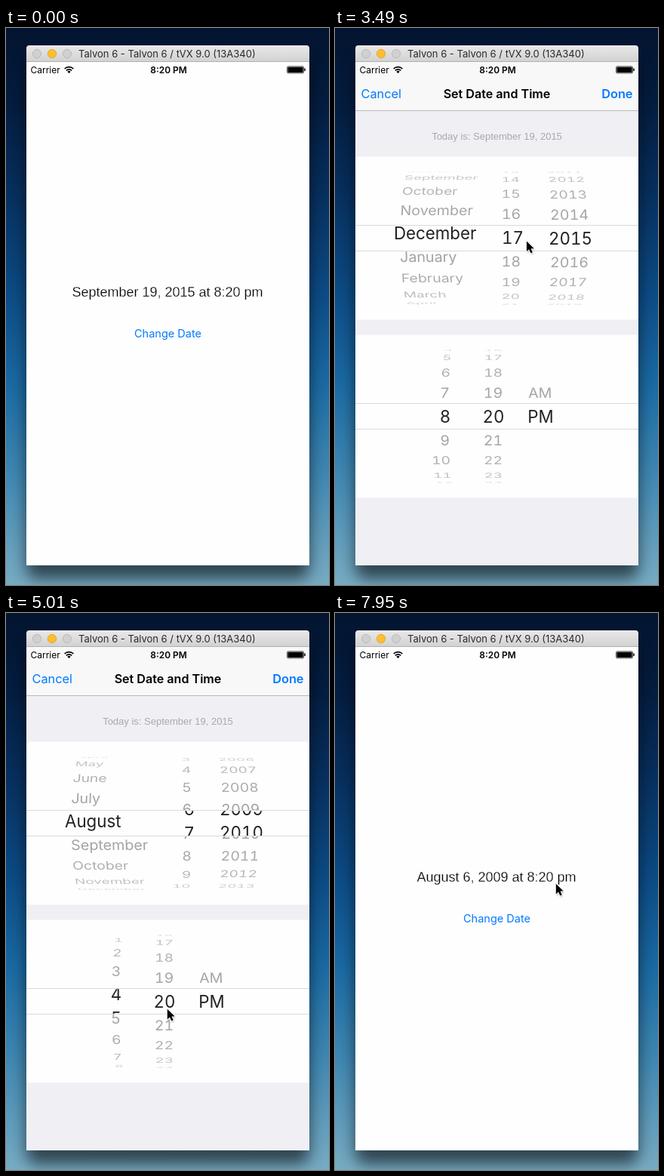
Write an HTML page that moves like this. It is 428 by 738 pixels and loops after 8000 ms.

```html
<!DOCTYPE html>
<html lang="en">
<head>
<meta charset="utf-8">
<title>Date picker</title>
<style>
  html, body { margin: 0; width: 100%; height: 100%; overflow: hidden; background: #03142f; }
  svg { display: block; width: 428px; height: 738px; font-family: Inter, Roboto, sans-serif; }
  .helv { font-family: "Liberation Sans", Arial, sans-serif; }
  .blue { fill: #007aff; }
  .outer, .inner { font-variant-numeric: tabular-nums; }
  .outer { font-size: 19.8px; fill: #a0a0a0; }
  .inner { font-size: 22.3px; fill: #222; }
</style>
</head>
<body>
<svg viewBox="0 0 428 738">
  <defs>
    <linearGradient id="sky" x1="0" y1="0" x2="0" y2="1">
      <stop offset="0" stop-color="#03142f"/>
      <stop offset=".14" stop-color="#041d40"/>
      <stop offset=".3" stop-color="#07305f"/>
      <stop offset=".48" stop-color="#0c4c86"/>
      <stop offset=".64" stop-color="#1b6aa3"/>
      <stop offset=".8" stop-color="#3f87b2"/>
      <stop offset="1" stop-color="#78abc2"/>
    </linearGradient>
    <linearGradient id="bar" x1="0" y1="0" x2="0" y2="1">
      <stop offset="0" stop-color="#e9e9e9"/>
      <stop offset="1" stop-color="#d1d1d1"/>
    </linearGradient>
    <filter id="blur" x="-20%" y="-20%" width="140%" height="140%"><feGaussianBlur stdDeviation="10"/></filter>
    <filter id="soft" x="-50%" y="-50%" width="200%" height="200%"><feGaussianBlur stdDeviation="1"/></filter>
    <clipPath id="screen"><rect x="27" y="45" width="375" height="667"/></clipPath>
    <clipPath id="band"><rect x="27" y="-16.5" width="375" height="33"/></clipPath>
    <path id="arrow" d="M0 0V13.6L3.2 10.7L5.5 15.8L7.9 14.7L5.7 9.8H9.9Z"/>
  </defs>

  <rect width="428" height="738" fill="url(#sky)"/>
  <rect x="27" y="40" width="375" height="690" rx="14" opacity=".58" filter="url(#blur)"/>
  <path d="M27 45V27a4 4 0 0 1 4-4H398a4 4 0 0 1 4 4V45Z" fill="url(#bar)"/>
  <path d="M27 44.5H402" stroke="#b1b1b1"/>
  <g fill="#d0d0d0" stroke="#b4b4b4" stroke-width=".8">
    <circle cx="41" cy="34" r="5.7"/>
    <circle cx="61" cy="34" r="5.7" fill="#ffbe2f" stroke="#dfa023"/>
    <circle cx="81" cy="34" r="5.7"/>
  </g>
  <text x="96" y="38.7" font-size="13" fill="#2a2a2a">Talvon 6 - Talvon 6 / tVX 9.0 (13A340)</text>

  <g clip-path="url(#screen)">
    <rect x="27" y="45" width="375" height="667" fill="#fefefe"/>
    <text id="label" class="helv" x="214" y="355.6" font-size="18" text-anchor="middle" stroke="#fefefe" stroke-width=".3"></text>
    <text id="change" class="blue" x="214.5" y="410" font-size="14.5" text-anchor="middle">Change Date</text>
    <g id="modal">
      <rect x="27" y="45" width="375" height="667" fill="#efeff4"/>
      <rect x="27" y="45" width="375" height="64" fill="#f8f8f9"/>
      <path d="M27 109.5H402" stroke="#b9b9bb"/>
      <g font-size="16.3">
        <text class="blue" x="34.5" y="93">Cancel</text>
        <text x="214.5" y="93" font-size="16.1" font-weight="600" text-anchor="middle">Set Date and Time</text>
        <text id="done" class="blue" x="394.5" y="93" font-weight="600" text-anchor="end">Done</text>
      </g>
      <text class="helv" x="214.5" y="147.5" font-size="13" fill="#a9a9ad" text-anchor="middle">Today is: September 19, 2015</text>
      <g id="date" transform="translate(0 278.7)"></g>
      <g id="time" transform="translate(0 514.7)"></g>
    </g>
  </g>

  <g font-size="12">
    <text x="32.5" y="59.6">Carrier</text>
    <text x="215.5" y="59.6" font-size="11.9" font-weight="600" text-anchor="middle">8:20 PM</text>
  </g>
  <g fill="none" stroke="#000" stroke-width="1.7">
    <path d="M77.6 54a8.4 8.4 0 0 1 11.8 0M79.8 56.3a5.3 5.3 0 0 1 7.4 0"/>
    <path d="M83.5 60L81.3 57.8a3.1 3.1 0 0 1 4.4 0Z" fill="#000" stroke="none"/>
    <rect x="372.5" y="50.9" width="22" height="9" rx="1.5" stroke-width=".7"/>
    <rect x="373.4" y="51.8" width="20.2" height="7.2" rx=".8" fill="#000" stroke="none"/>
    <path d="M396 53.6V57" stroke-width="1.4"/>
  </g>

  <g id="cursor">
    <use href="#arrow" x=".8" y="1.8" opacity=".4" filter="url(#soft)"/>
    <use href="#arrow" stroke="#fff" stroke-width="1.8" stroke-linejoin="round"/>
    <use href="#arrow"/>
  </g>
</svg>

<script>
const LOOP = 8000, TILT = 20.7 * Math.PI / 180, RADIUS = 88, MID_X = 214.5, DEPTH = .09;
const OPEN = 2050, CLOSE = 6285;
const $ = id => document.getElementById(id);
const mod = (n, m) => ((n % m) + m) % m;
const clamp = v => Math.min(1, Math.max(0, v));

function add(parent, tag, attrs) {
  const el = document.createElementNS('http://www.w3.org/2000/svg', tag);
  for (const k in attrs) el.setAttribute(k, attrs[k]);
  return parent.appendChild(el);
}

// A flicked wheel coasts from one value to another
const flick = (from, to, start, tau, span) => t => {
  const end = Math.exp(-span / tau);
  const left = (Math.exp(-Math.max(0, t - start) / tau) - end) / (1 - end);
  return to + (from - to) * clamp(left);
};

const monthName = i => new Date(2015, mod(i - 1, 12), 1).toLocaleString('en-US', { month: 'long' });

// x: anchor of the selected row, side: anchor of the other rows, mid: column centre
const dateWheels = [
  { x: 78, side: 85.5, mid: 125, anchor: 'start', text: monthName, at: flick(9, -4, 2907, 530, 2350) },
  { x: 250, side: 246.3, mid: 235, anchor: 'end', text: i => mod(i - 1, 31) + 1, at: flick(19, 6, 3389, 650, 2100) },
  { x: 312, side: 311, mid: 311, anchor: 'middle', text: i => i, at: flick(2015, 2009, 3990, 500, 1700) }
];
const timeWheels = [
  { x: 153.3, side: 151.7, mid: 145, anchor: 'end', text: i => mod(i - 1, 12) + 1, at: flick(8, 1, 4635, 510, 2200) },
  { x: 210, side: 209.5, mid: 210, anchor: 'middle', text: i => String(mod(i, 60)).padStart(2, '0'), at: flick(20, 5, 5150, 495, 2400) },
  { x: 272.5, side: 272, mid: 272, anchor: 'middle', text: i => ['AM', 'PM'][i] || '', at: () => 1 }
];

function buildPicker(parent, wheels) {
  add(parent, 'rect', { x: 27, y: -108.2, width: 375, height: 216, fill: '#fefefe' });
  const outer = add(parent, 'g', { class: 'outer' });
  add(parent, 'rect', { x: 27, y: -17, width: 375, height: 34, fill: '#fefefe' });
  const inner = add(parent, 'g', { class: 'inner', 'clip-path': 'url(#band)' });
  add(parent, 'path', { d: 'M27 -17.2H402M27 16.8H402', stroke: '#dadada' });
  for (const w of wheels) {
    w.outer = Array.from({ length: 11 }, () => add(outer, 'text', { x: w.side, y: 7.2, 'text-anchor': w.anchor }));
    w.inner = Array.from({ length: 3 }, () => add(inner, 'text', { x: w.x, 'text-anchor': w.anchor }));
  }
}

// Rows lie on a cylinder; the selected band shows a flat, larger copy
function drawWheel(w, t) {
  const v = w.at(t), near = Math.round(v);
  w.outer.forEach((el, k) => {
    const i = near + k - 5, a = (i - v) * TILT;
    const shown = Math.abs(a) < 1.53;
    el.textContent = shown ? w.text(i) : '';
    if (!shown) return;
    const cos = Math.cos(a), sin = Math.sin(a), s = 1 / (1 + DEPTH * (1 - cos));
    const skew = (MID_X - w.mid) * DEPTH * sin * s * s / RADIUS;
    el.setAttribute('transform', `matrix(${s} 0 ${skew} ${cos} ${MID_X * (1 - s)} ${RADIUS * sin})`);
    el.setAttribute('opacity', .3 + .7 * cos);
  });
  w.inner.forEach((el, k) => {
    const i = near + k - 1;
    el.textContent = w.text(i);
    el.setAttribute('y', (i - v) * 31.5 + 8.1);
  });
}

// Pointer stops: time, x, y
const stops = [
  [510, 0, 535], [800, 243, 360], [930, 229, 398], [2300, 229, 398], [2730, 149, 305],
  [2880, 148, 287], [3120, 156, 345], [3390, 237, 280], [3810, 304, 287], [3980, 302, 312],
  [4500, 152, 556], [4900, 208, 505], [5280, 225, 570], [5460, 366, 88], [6610, 366, 88],
  [6880, 285, 318], [7350, 125, 345], [7860, 292, 358], [LOOP, 292, 358]
];

function pointer(t) {
  const n = stops.findIndex(s => s[0] > t);
  if (n < 1) return null;
  const [a, ax, ay] = stops[n - 1], [b, bx, by] = stops[n];
  const u = (t - a) / (b - a);
  return [ax + (bx - ax) * u, ay + (by - ay) * u];
}

// Remaining share of a critically damped spring
const spring = (ms, w) => (1 + w * ms / 1000) * Math.exp(-w * ms / 1000);

function hiddenShare(t) {
  if (t < OPEN) return 1;
  const share = t < CLOSE ? spring(t - OPEN, 14.8) : 1 - spring(t - CLOSE, 22.8);
  return share < .002 ? 0 : share > .98 ? 1 : share;
}

// A pressed button dims at once and then fades back
const pressed = (t, at, rest, fade) => t < at ? 1 : .25 + .75 * clamp((t - at - rest) / fade);

function render(t) {
  const hidden = hiddenShare(t), p = pointer(t);
  $('label').textContent = (t < CLOSE ? 'September 19, 2015' : 'August 6, 2009') + ' at 8:20 pm';
  $('change').setAttribute('opacity', pressed(t, 1260, 90, 420));
  $('done').setAttribute('opacity', pressed(t, 6190, 50, 300));
  $('modal').setAttribute('transform', `translate(0 ${667 * hidden})`);
  if (hidden < 1) for (const w of [...dateWheels, ...timeWheels]) drawWheel(w, t);
  $('cursor').setAttribute('visibility', p ? 'visible' : 'hidden');
  if (p) $('cursor').setAttribute('transform', `translate(${p[0] + .8} ${p[1] + .8})`);
}

buildPicker($('date'), dateWheels);
buildPicker($('time'), timeWheels);

const began = performance.now();
function loop() {
  render((performance.now() - began) % LOOP);
  requestAnimationFrame(loop);
}
loop();
</script>
</body>
</html>
```
